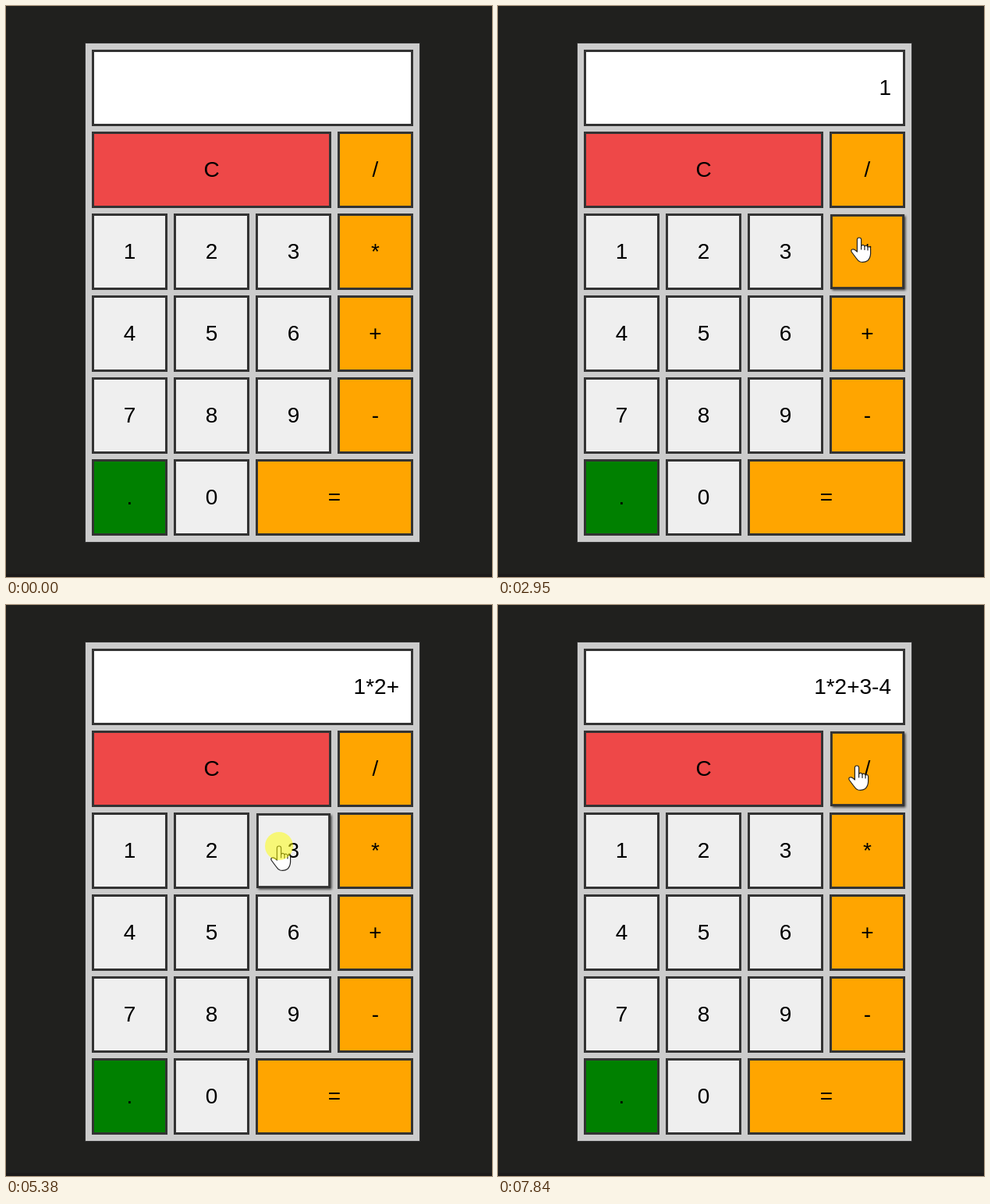
An HTML page that plays this animation: 623x732 px, repeating every 8000 ms.

```html
<!DOCTYPE html>
<html lang="en">
<head>
<meta charset="utf-8">
<title>Calculator</title>
<style>
  html, body { margin: 0; width: 100%; height: 100%; overflow: hidden; background: #20201e; }
  #stage { position: relative; width: 623px; height: 732px; overflow: hidden;
    font: 28px Arial, "Liberation Sans", sans-serif; color: #000; }
  #stage > * { position: absolute; box-sizing: border-box; }
  #floor { left: 0; top: 728px; width: 623px; height: 4px; background: #1c1a1a; }
  #body { left: 101px; top: 47px; width: 430px; height: 641px;
    background: #ccc; border: 1px solid #333; }
  .cell { display: flex; align-items: center; justify-content: center; height: 98px;
    border: 3px solid #333; background: #efefef; white-space: pre; }
  .cell.screen { background: #fff; justify-content: flex-end; padding-right: 15px; }
  .cell.op { background: #ffa500; }
  .cell.clear { background: #ee4848; }
  .cell.dot { background: #008000; }
  .cell.hover { transform: scale(.98); box-shadow: 2px 2px 3px #333; }
  #pointer { left: 0; top: 0; width: 1px; height: 1px; overflow: visible; }
  #pointer path { stroke: #222; stroke-width: 1.2; stroke-linejoin: round; stroke-linecap: round; }
</style>
</head>
<body>
<div id="stage">
  <div id="floor"></div>
  <div id="body"></div>
  <svg id="pointer">
    <g id="hand">
      <path fill="#fff" d="M-2.6 18V2.6Q-2.6 0 0 0Q2.6 0 2.6 2.6V10.5Q5 8 7 10.8Q9.5 9 11 12Q14.2 10.6 14.6 14V20.5Q14.4 26 10.8 29.5Q7 32 1.5 31Q-1.5 30-4 26L-9.6 18.5Q-11 16-9 15Q-7 14.4-5 16Z"/>
      <path fill="none" d="M2.6 10.5V15M7 10.8V15.5M11 12V16"/>
    </g>
    <path id="arrow" fill="#fff" d="M0 0V24L5.6 18.8L9.2 27.4L13 25.8L9.4 17.4H17Z"/>
    <circle id="glow" r="18" fill="#ff0" fill-opacity=".5"/>
  </svg>
</div>
<script>
const LOOP = 8000, STEP = 70, ARC = 0.14;
const $ = id => document.getElementById(id);
const stage = $('stage'), pointer = $('pointer');

// Each key is its label, repeated once per column it spans
const rows = ['    ', 'CCC/', '123*', '456+', '789-', '.0=='];
const kinds = { ' ': 'screen', C: 'clear', '.': 'dot' };
const kindOf = key => kinds[key] || ('/*+-='.includes(key) ? 'op' : '');

function makeCell(key, col, row, span) {
  const el = document.createElement('div');
  const x = 110 + 105 * col, y = 56 + 105 * row, w = 105 * span - 8;
  el.className = 'cell ' + kindOf(key);
  el.textContent = key.trim();
  el.style.cssText = `left:${x}px;top:${y}px;width:${w}px`;
  stage.insertBefore(el, pointer);
  return { el, x, y, w, h: 98 };
}

const [screen, ...keys] = rows.flatMap((line, row) =>
  [...new Set(line)].map(key =>
    makeCell(key, line.indexOf(key), row, line.split(key).length - 1)));

// Where the pointer goes and when; it types a key on release after a press
const stops = [
  { x: 189, y: 304, leave: 190, arrive: 950, press: 1150, key: '1' },
  { x: 470, y: 290, leave: 1220, arrive: 1890 },
  { x: 463, y: 297, leave: 2880, arrive: 2950, press: 3080, key: '*' },
  { x: 270, y: 322, leave: 3150, arrive: 3670, press: 3740, key: '2' },
  { x: 469, y: 415, leave: 3880, arrive: 4520, press: 4560, key: '+' },
  { x: 350, y: 309, leave: 4640, arrive: 5300, press: 5380, key: '3' },
  { x: 481, y: 498, leave: 5450, arrive: 6060, press: 6135, key: '-' },
  { x: 162, y: 403, leave: 6340, arrive: 7015, press: 7090, key: '4' },
  { x: 460, y: 206, leave: 7360, arrive: 7840 }
];
const presses = stops.filter(s => s.key);

// Eased moves along a raised arc, sampled every STEP
function locate(t) {
  let x = 598, y = 700;
  for (const s of stops) {
    if (t < s.leave) break;
    const since = Math.floor((t - s.leave) / STEP) * STEP;
    const p = t >= s.arrive ? 1 : since / (s.arrive - s.leave);
    const e = p * p * (3 - 2 * p);
    const dx = s.x - x, dy = s.y - y;
    x += dx * e;
    y += dy * e - 4 * e * (1 - e) * ARC * Math.hypot(dx, dy);
  }
  return [Math.round(x), Math.round(y)];
}

const show = (el, on) => { el.style.display = on ? '' : 'none'; };

function draw(t) {
  const [x, y] = locate(t);
  const visible = t >= stops[0].leave;
  let over = false;
  for (const k of keys) {
    const hit = visible && x >= k.x && x < k.x + k.w && y >= k.y && y < k.y + k.h;
    k.el.classList.toggle('hover', hit);
    over = over || hit;
  }
  screen.el.textContent = presses.filter(s => t >= s.press + STEP).map(s => s.key).join('');
  show(pointer, visible);
  show($('hand'), over);
  show($('arrow'), !over);
  show($('glow'), presses.some(s => t >= s.press && t < s.press + STEP));
  pointer.style.transform = `translate(${x}px, ${y}px)`;
}

const begin = performance.now();
function tick() {
  draw((performance.now() - begin) % LOOP);
  requestAnimationFrame(tick);
}
tick();
</script>
</body>
</html>
```
